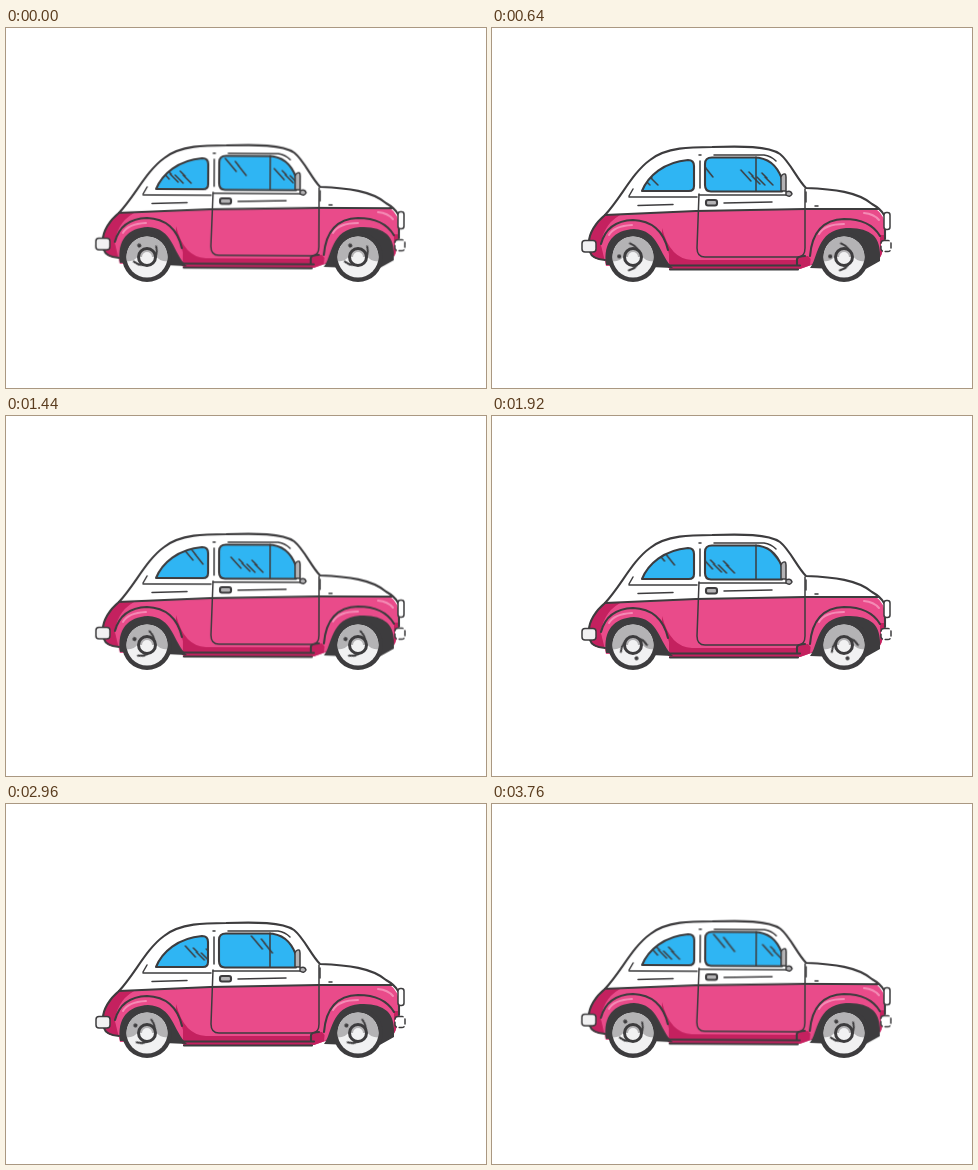
An HTML page without scripts for the animation above (3840 ms loop, 480x360 px).

```html
<!DOCTYPE html>
<html lang="en">
<head>
<meta charset="utf-8">
<title>Little car</title>
<style>
  html, body { margin: 0; width: 100%; height: 100%; overflow: hidden; background: #fff; }
  svg { display: block; width: 480px; height: 360px; }
  .line { fill: none; stroke: #3d3c3e; stroke-width: 2.1; stroke-linecap: round; stroke-linejoin: round; }
  .thin { stroke-width: 1.5; }
  .ink { fill: #3d3c3e; }
  .white { fill: #fff; }
  .grey { fill: #b4b3b5; }
  .pale { fill: #f1f1f2; }
  .pink { fill: #e94b8a; }
  .deep { fill: #c4215f; }
  .glass { fill: #2fb5f3; }
  .body { transform-origin: 245px 190px; animation: bump 1280ms infinite; }
  .glints { animation: slide 3840ms steps(48) infinite; }
  .spin { animation: roll 3840ms steps(48) infinite; }
  @keyframes bump {
    0% { transform: translateY(-1.5px) rotate(.3deg); animation-timing-function: steps(4); }
    25%, 68.75% { transform: none; animation-timing-function: steps(4); }
    93.75%, 100% { transform: translateY(-1.5px) rotate(.3deg); }
  }
  @keyframes slide { to { transform: translateX(-115px); } }
  /* five turns in 47 steps, plus the closing step */
  @keyframes roll {
    from { transform: rotate(-124deg); }
    to { transform: rotate(1714.3deg); }
  }
</style>
</head>
<body>
<svg viewBox="0 0 480 360">
  <defs>
    <path id="rearGlass" d="M150 163C156 148 172 134 196 132Q202 132 202 138V158Q202 163 197 163Z"/>
    <path id="doorGlass" d="M213 136Q213 129.500 220 129.500H262C279 129.500 286 140 290 151V163.500H219Q213 163.500 213 157Z"/>
    <clipPath id="panes"><use href="#rearGlass"/><use href="#doorGlass"/></clipPath>
    <path id="lower" d="M113 187C103 195 97 206 97 216Q97 227 104 231L114 232 172 236 178 241H308L322 236 386 233Q394 222 393 200Q393 187 384 181L313 181 204 183Z"/>
    <clipPath id="lowerClip"><use href="#lower"/></clipPath>
    <g id="glintSet" class="line thin">
      <path d="M169 149L177 157M174 145L179 150M177 149L185 157"/>
      <path d="M219 132L230 145M229 135L233 140M232 139L240 149"/>
      <path d="M268 142L278 153M276 144L280 148M279 148L287 156"/>
    </g>
    <g id="tyre">
      <circle class="ink" r="25"/>
      <circle class="pale" r="20.5"/>
      <path class="grey" d="M-20 4.500A20.500 20.500 0 1 1 20 4.500Q12 4 9 -1H-9Q-12 4 -20 4.500Z"/>
    </g>
    <g id="trim">
      <circle class="ink" cx="13.8" r="2.1"/>
      <path class="line" d="M3.600 13.500A14 14 0 0 1 3.600 -13.500"/>
    </g>
    <g id="hub">
      <circle class="pale" r="8.500"/>
      <path class="grey" d="M-8 0A8 8 0 0 1 8 0Z"/>
      <circle class="line" r="8.500" style="stroke-width:3"/>
      <circle class="pale" r="5"/>
    </g>
  </defs>

  <g class="body">
    <path class="white" d="M113 187C129 170 140 145 158 132C174 119 200 119 220 119C250 118 276 118 288 126C298 134 305 151 314 160C342 161 366 164 384 181Z"/>
    <use href="#lower" class="pink"/>
    <g class="deep" clip-path="url(#lowerClip)">
      <path d="M95 185H132Q112 194 109 216L114 234H95Z"/>
      <path d="M170 200Q178 231 200 232H304Q307 228 316 228L330 243H170Z"/>
      <path d="M386 207H396V235H383Z"/>
    </g>
    <path class="pink" d="M109 217Q114 193 141 192Q169 193 177 226V238H114ZM318 237Q320 192 352 191Q380 191 388 208V232H330Z"/>
    <path class="ink" d="M114 237C111 214 122 202 142 201C167 202 167 227 181 240ZM318 240C326 231 324 202 354 200Q372 199 381 207Q389 214 388 233L372 242Z"/>
    <g class="line">
      <path d="M113 187C129 170 140 145 158 132C174 119 200 119 220 119C250 118 276 118 288 126C298 134 305 151 314 160C342 161 366 164 380 176Q389 181 392 187"/>
      <path d="M113 187L204 183 313 181 386 181M113 187C103 195 97 206 97 214M98 224Q100 231 113 232M393 187V211"/>
      <path d="M109 216Q115 193 141 192Q169 193 176 222M318 228Q321 192 352 191Q378 191 388 208"/>
      <path d="M174 237.500H308M178 241.500H306M305 237V231Q306 228 313 228"/>
      <path class="thin" d="M207 166L205 220Q205 229 213 229H306Q313 229 313 220V161"/>
      <path class="thin" d="M208 133V160M222 127H272Q279 128 284 133M207 127H209M137 168L141 161M137 169H205M207 167H296M146 177.500L181 176.500M232 175L280 174M314 164V174M323 178H326"/>
    </g>
    <path d="M117 207Q122 198 140 197M327 206Q333 196 352 196M372 185Q382 186 387 192" fill="none" stroke="#f48bb5" stroke-width="2" stroke-linecap="round"/>
    <use href="#rearGlass" class="glass"/>
    <use href="#doorGlass" class="glass"/>
    <g clip-path="url(#panes)">
      <g class="glints">
        <use href="#glintSet" x="-115"/>
        <use href="#glintSet"/>
        <use href="#glintSet" x="115"/>
      </g>
    </g>
    <g class="line">
      <use href="#rearGlass"/>
      <use href="#doorGlass"/>
      <path class="thin" d="M264 129V163"/>
      <rect x="214" y="172" width="11" height="5.5" rx="2" style="fill:#b4b3b5"/>
      <path class="thin" d="M290 147Q294 144 294 149V163H289V149ZM294 164Q299 162 300 166Q298 170 294 167Z" style="fill:#b4b3b5"/>
      <rect class="thin" x="90" y="212.5" width="14" height="11.5" rx="3" style="fill:#f1f1f2"/>
      <rect class="thin" x="392" y="184.500" width="6" height="17" rx="2.500" style="fill:#fff"/>
      <rect class="thin" x="389" y="212.5" width="10" height="11" rx="3" style="fill:#fff" stroke-dasharray="5 3"/>
    </g>
  </g>

  <g transform="translate(141 229)">
    <use href="#tyre"/>
    <g class="spin"><use href="#trim"/></g>
    <use href="#hub"/>
  </g>
  <g transform="translate(352 229)">
    <use href="#tyre"/>
    <g class="spin"><use href="#trim"/></g>
    <use href="#hub"/>
  </g>
</svg>
</body>
</html>
```
